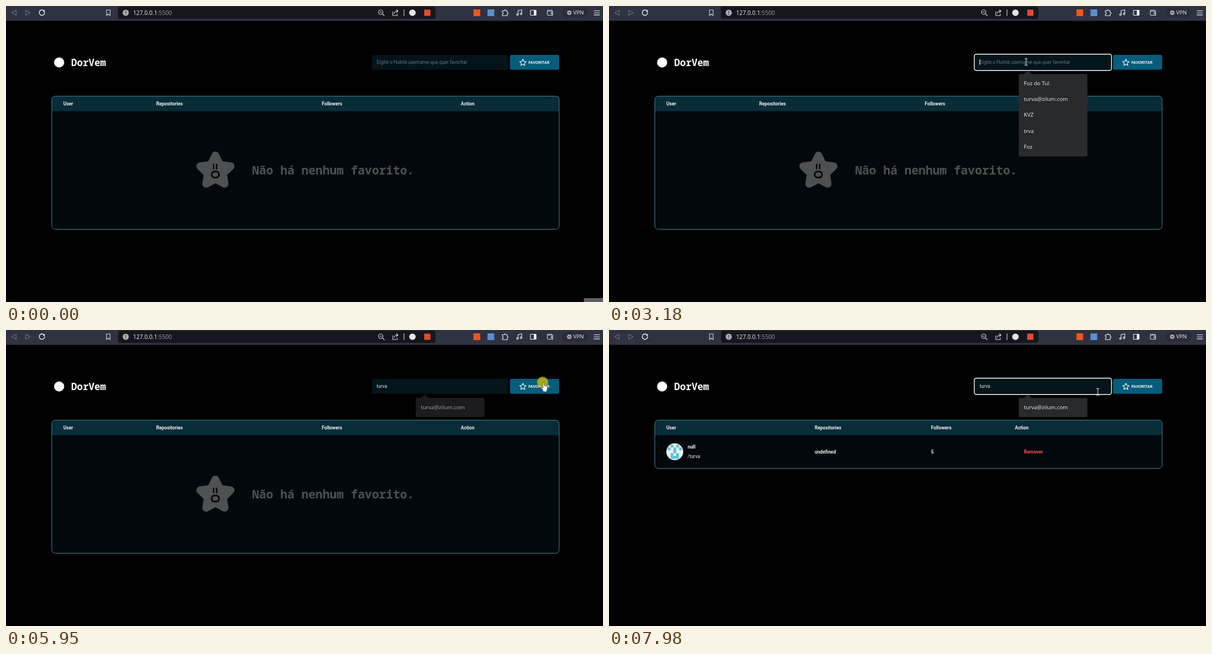
An HTML page for the animation above (8000 ms loop, 1062 px wide and 527 px high).

```html
<!DOCTYPE html>
<html lang="pt">
<head>
<meta charset="utf-8">
<title>DorVem</title>
<style>
html, body { margin: 0; width: 100%; height: 100%; overflow: hidden; background: #000; }
.stage { position: relative; width: 1062px; height: 527px; overflow: hidden; }
.stage > svg { position: absolute; left: 0; top: 0; }
text, .typed { font-family: Roboto, sans-serif; font-size: 8.37px; fill: #eef2f3; color: #e6ebec; }
.b { font-weight: 700; }
.mono { font-family: "Noto Sans Mono", "DejaVu Sans Mono", monospace; font-weight: 600; }
.ui { font-family: "Open Sans", "Noto Sans", sans-serif; font-size: 10.2px; }
.line { fill: none; stroke: #d3d5dc; stroke-width: 1.1; stroke-linejoin: round; stroke-linecap: round; }

/* 1% of the loop = 80 ms */
.step { animation: 8s step-end infinite; }
.tip { animation-name: tip; }
.empty { animation-name: empty; }
.filled { animation-name: filled; }
.avatar { animation-name: avatar; }
.hint { animation-name: hint; }
.ring { animation-name: ring; }
@keyframes tip { 0% { opacity: 1 } .875%, 100% { opacity: 0 } }
@keyframes empty { 0% { opacity: 1 } 78.75%, 100% { opacity: 0 } }
@keyframes filled { 0% { opacity: 0 } 78.75%, 100% { opacity: 1 } }
@keyframes avatar { 0% { opacity: 0 } 80.5%, 100% { opacity: 1 } }
@keyframes hint { 0%, 78.75% { opacity: 1 } 43.875%, 85.5%, 100% { opacity: 0 } }
@keyframes ring { 0%, 74.25% { opacity: 0 } 25.375%, 81.25%, 100% { opacity: 1 } }

.typed { position: absolute; left: 659.3px; top: 94px; height: 12px; line-height: 12px; animation-name: type; }
.typed span { display: block; width: 100%; overflow: hidden; white-space: nowrap; }
.typed::after { content: ""; position: absolute; left: 100%; top: 1px; width: 1px; height: 10px; background: #fff; animation: caret 8s step-end infinite; }
@keyframes type {
  0%, 78.75% { width: 0 }
  43.875%, 85.5% { width: 2.8px }
  44.875%, 86.5% { width: 7.4px }
  45.875% { width: 10.2px }
  46.875%, 87.25% { width: 14.2px }
  47.875%, 88%, 100% { width: 18.8px }
}
@keyframes caret {
  0%, 33%, 54.5%, 67.75%, 94.625%, 100% { opacity: 0 }
  25.375%, 39.75%, 61.125%, 81.25% { opacity: 1 }
}

.pop { position: absolute; left: 728.5px; top: 121px; width: 122.5px; color: #f1f1f2; animation: pop 8s linear infinite; }
.pop::before { content: ""; position: absolute; left: 9.5px; top: -6.5px; border: 7px solid transparent; border-top: 0; border-bottom: 6.5px solid #292a2d; }
.box { position: relative; overflow: hidden; border-radius: 2px; background: #292a2d; animation-name: box; }
.list { position: absolute; left: 9.5px; top: 3px; font: 9.65px/28.2px "Open Sans", "Noto Sans", sans-serif; white-space: pre; }
.all { animation-name: all; }
.some { animation-name: some; }
@keyframes pop {
  0%, 25.375% { opacity: 0 }
  26.1%, 74% { opacity: 1 }
  75.25%, 81.25% { opacity: 0 }
  82%, 100% { opacity: 1 }
}
@keyframes box {
  0%, 81% { height: 147px }
  43.875%, 85.5% { height: 62.4px }
  86.5% { height: 39px }
  44.875%, 87.25%, 100% { height: 34.2px }
}
@keyframes all { 0%, 81% { opacity: 1 } 43.875%, 85.5%, 100% { opacity: 0 } }
@keyframes some { 0%, 81% { opacity: 0 } 43.875%, 85.5%, 100% { opacity: 1 } }

.pointer { animation: move 8s linear infinite; }
.arrow { animation-name: arrow; }
.beam { animation-name: beam; }
.hand { animation-name: hand; }
.halo { fill: #c2b611; animation: halo 8s linear infinite; }
@keyframes move {
  0%, 10.125% { transform: translate(1020px, 518px); animation-timing-function: cubic-bezier(.3, .2, .4, 1) }
  19.375%, 20.5% { transform: translate(756px, 117px); animation-timing-function: ease-out }
  24.4%, 68% { transform: translate(742px, 99.5px); animation-timing-function: ease-in-out }
  73.25%, 77.5% { transform: translate(956.5px, 93.5px) }
  79.5%, 89.75% { transform: translate(799.5px, 90px); animation-timing-function: ease-in-out }
  94% { transform: translate(674px, 101px); animation-timing-function: ease-in-out }
  98.5% { transform: translate(862px, 113px) }
  99.7%, 100% { transform: translate(869.5px, 110px) }
}
@keyframes arrow { 0%, 21.4%, 100% { opacity: 0 } 10.125% { opacity: 1 } }
@keyframes beam { 0%, 71.4% { opacity: 0 } 21.4%, 78.4%, 100% { opacity: 1 } }
@keyframes hand { 0%, 78.4%, 100% { opacity: 0 } 71.4% { opacity: 1 } }
@keyframes halo {
  0%, 25.3%, 27.8%, 73.4%, 77%, 80.4%, 82.1%, 100% { opacity: 0 }
  25.4%, 26.6%, 73.5%, 75.6%, 80.5%, 81.2% { opacity: .85 }
}
</style>
</head>
<body>
<div class="stage">
<svg width="1062" height="527" viewBox="0 0 1062 527">
  <!-- browser bar -->
  <rect width="1062" height="26.5" fill="#2f3241"/>
  <rect x="199" y="1" width="565" height="22" rx="4" fill="#16171e"/>
  <g class="line">
    <path d="M18 7.5v9l-8-4.5zM35 7.5v9l8-4.5z" stroke="#6d707d"/>
    <path d="M67.6 8.6A4.8 4.8 0 1 0 68.8 12" stroke="#f4f4f6" stroke-width="1.4"/>
    <path d="M69 6.8v3.6h-3.6z" fill="#f4f4f6" stroke="none"/>
    <path d="M178.8 7h6.4v10l-3.2-2.6-3.2 2.6z"/>
    <circle cx="666.5" cy="11" r="4"/>
    <path d="M669.5 14l3.5 3.5M664.6 11h3.8"/>
    <path d="M688 10v7h8v-3M690.5 13.5q.5-4.5 6.5-4.5M694.5 6.5L697.3 9l-2.8 2.5"/>
    <path d="M708 6.5v11"/>
    <path d="M883 8.5h3a1.6 1.6 0 0 1 3.2 0h2.3v2.8a1.6 1.6 0 0 1 0 3.2v2.7H883v-2.7a1.6 1.6 0 0 0 0-3.2z" stroke="#f0f0f4"/>
    <path d="M911 15.3V8.2l6.5-1.5v7" stroke="#f0f0f4"/>
    <circle cx="909.7" cy="15.3" r="1.5" stroke="#f0f0f4"/>
    <circle cx="916.2" cy="13.9" r="1.5" stroke="#f0f0f4"/>
    <rect x="933" y="7.5" width="10" height="9" rx="1" stroke="#f4f4f6"/>
    <path d="M939.5 8h3v8h-3z" fill="#f4f4f6" stroke="#f4f4f6"/>
    <path d="M963 9.3V15a1.5 1.5 0 0 0 1.5 1.5h8V9.3zM963 9.3a1.5 1.5 0 0 1 1.5-1.8h6.5v1.8M972.5 11.5h-2.8v2.6h2.8"/>
    <path d="M1046 8.5h10M1046 12.2h10M1046 15.9h10" stroke="#eeeef2"/>
  </g>
  <circle cx="213" cy="12" r="5.5" fill="#a9abb1"/>
  <path d="M213 9v3.6M213 14v1.2" stroke="#24252c" stroke-width="1.2"/>
  <text class="ui" x="226" y="15.7">127.0.0.1<tspan fill="#9a9ca4">:5500</tspan></text>
  <circle cx="723" cy="12" r="5.8" fill="#e4e4e8"/>
  <rect x="744" y="6.5" width="11" height="11" fill="#e8492d"/>
  <rect x="831.5" y="6" width="12" height="12" fill="#f0571c"/>
  <rect x="856.5" y="6" width="12" height="12" fill="#5a8fd0"/>
  <rect x="989" y="2" width="48" height="20" rx="10" fill="#2a2c3a" stroke="#383b4a" stroke-width=".8"/>
  <circle cx="1002" cy="12" r="4" fill="#a5a7ae"/>
  <path d="M1000 12h4" stroke="#2a2c3a" stroke-width="1.2"/>
  <text class="ui" x="1009" y="15.4" style="font-size:9.6px">VPN</text>

  <!-- page header -->
  <circle cx="94.5" cy="100.5" r="9" fill="#fff"/>
  <text class="mono" x="116" y="106.8" style="font-size:17.2px;fill:#fff">DorVem</text>
  <rect x="651" y="87" width="241.5" height="26.5" rx="3" fill="#03151b"/>
  <rect class="step ring" x="649.8" y="85.8" width="244" height="29" rx="3.5" fill="none" stroke="#fff" stroke-width="1.4"/>
  <text class="step hint" x="659.3" y="102.8" style="fill:#6c7376">Digite o Hulnib username que quer favoritar</text>
  <rect x="896.5" y="87" width="87.5" height="26.5" rx="3" fill="#065d7b"/>
  <path class="line" style="stroke:#fff" d="M919.5 94.8l1.7 3.7 4 .5-3 2.8.8 4-3.5-2-3.5 2 .8-4-3-2.8 4-.5z"/>
  <text class="b" x="929.3" y="102.7" style="font-size:7.2px">FAVORITAR</text>

  <!-- empty table -->
  <g class="step empty">
    <rect x="81.5" y="160.5" width="902.5" height="237" rx="6" fill="#02090c"/>
    <path d="M81.5 187.3v-20.8a6 6 0 0 1 6-6h890.5a6 6 0 0 1 6 6v20.8z" fill="#082c38"/>
    <rect x="81.5" y="160.5" width="902.5" height="237" rx="6" fill="none" stroke="#42808f"/>
    <g class="b">
      <text x="102" y="176.5">User</text>
      <text x="267.2" y="176.5">Repositories</text>
      <text x="561.7" y="176.5">Followers</text>
      <text x="809" y="176.5">Action</text>
    </g>
    <path d="M372.5 266l8.2 16.7 18.9 2.6-13.5 13 2.9 18.4-16.5-8.7-16.5 8.7 2.9-18.4-13.5-13 18.9-2.6z" fill="#4d5154" stroke="#4d5154" stroke-width="13.5" stroke-linejoin="round"/>
    <path d="M369.3 281v9.5M374.8 281v9.5" stroke="#02090c" stroke-width="2.5"/>
    <rect x="365.8" y="294.8" width="13.2" height="10.6" rx="5.3" fill="none" stroke="#02090c" stroke-width="3"/>
    <text class="mono" x="437.8" y="300" style="font-size:20.9px;fill:#4d5154">Não há nenhum favorito.</text>
  </g>

  <!-- table with one row -->
  <g class="step filled">
    <rect x="81.5" y="160.5" width="902.5" height="86" rx="6" fill="#02090c"/>
    <path d="M81.5 187.3v-20.8a6 6 0 0 1 6-6h890.5a6 6 0 0 1 6 6v20.8z" fill="#082c38"/>
    <rect x="81.5" y="160.5" width="902.5" height="86" rx="6" fill="none" stroke="#42808f"/>
    <g class="b">
      <text x="102" y="176.5">User</text>
      <text x="366" y="176.5">Repositories</text>
      <text x="572.8" y="176.5">Followers</text>
      <text x="722" y="176.5">Action</text>
      <text x="140" y="210.7">null</text>
      <text x="366" y="219.7">undefined</text>
      <text x="572.8" y="219.7">5</text>
      <text x="738.3" y="219.7" style="fill:#fb4f4f">Remover</text>
    </g>
    <text x="139.8" y="227.6">/turva</text>
    <g class="step avatar">
      <circle cx="117" cy="216.8" r="15" fill="#f0f0f0"/>
      <path d="M109.5 204.3h5v5h-5zM119.5 204.3h5v5h-5zM104.5 209.3h5v5h-5zM114.5 209.3h5v10h-5zM124.5 209.3h5v5h-5zM109.5 219.3h5v5h5v-5h5v10h-15z" fill="#55c7d8"/>
    </g>
  </g>
  <rect class="step tip" x="1028" y="520" width="34" height="7" fill="#5c5c5c"/>
</svg>

<div class="step typed"><span>turva</span></div>

<div class="pop"><div class="step box">
<div class="step list all">Foz do Tul
turva@zilum.com
KVZ
trva
Foz</div>
<div class="step list some">turva@zilum.com
trva</div>
</div></div>

<svg width="1062" height="527" viewBox="0 0 1062 527">
  <g class="pointer">
    <circle class="halo" cx="-2" cy="-.5" r="9.8"/>
    <path class="step arrow" d="M0 0v13l3-2.8 2 4.6 2.1-.9-2-4.5h4.1z" fill="#fff" stroke="#000" stroke-width=".7"/>
    <path class="step beam" d="M-2.7-5.7h2L0-5l.7-.7h2M0-5v10.2M-2.7 5.9h2L0 5.2l.7.7h2" fill="none" stroke="#e4e6e6" stroke-width="1.1"/>
    <path class="step hand" d="M-1.5 1a1.3 1.3 0 0 1 2.6 0v4.6l1.6.1 1.6.4 1.5.5q1.2.5 1 2.2l-.5 4.2-1 1.6v2H-1v-1.7l-2.8-4.3q-1-1.6.1-2.2.9-.4 2.2 1.2z" fill="#fff" stroke="#111" stroke-width=".7"/>
  </g>
</svg>
</div>
</body>
</html>
```
